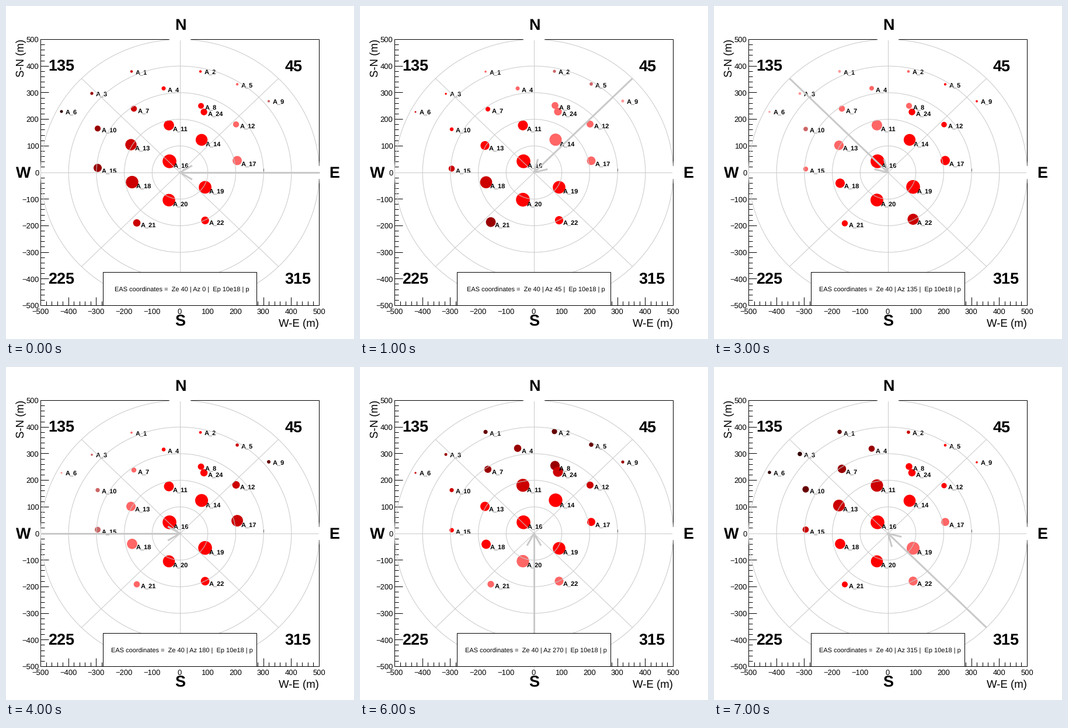
Animation of 596x572 px, one loop 8000 ms. Source, as a matplotlib script:

```python
import numpy as np
import matplotlib.pyplot as plt
from matplotlib.animation import FuncAnimation
from matplotlib.patches import Circle, Ellipse, Rectangle

W, H, DPI = 596, 572, 100
PX = 72 / DPI
CX, CY = 298, 286            # shower core on the stage
SX, SY = 0.477, 0.457        # pixels per metre
LEFT, RIGHT, TOP, BOTTOM = 59, 536, 57, 514
GREY = "#c9c9c9"
ZENITH = np.radians(40)

plt.rcParams["font.family"] = "Liberation Sans"
plt.rcParams["text.hinting"] = "none"

# Ground plan of the detectors
SITES = {
    1: (215, 114), 2: (333, 114), 3: (147, 152), 4: (270, 144),
    5: (396, 136), 6: (95, 183), 7: (219, 180), 8: (334, 175),
    9: (450, 165), 10: (157, 214), 11: (279, 211), 12: (394, 207),
    13: (214, 245), 14: (335, 237), 15: (157, 283), 16: (280, 275),
    17: (396, 271), 18: (216, 310), 19: (341, 319), 20: (279, 341),
    21: (224, 377), 22: (341, 373), 24: (339, 186),
}

# Colour by metres ahead of the core, from late to early arrival
LIMITS = [-400, -317, -226, -130, 100, 290, 383]
SHADES = ["#330000", "#660000", "#990000", "#cc0000",
          "#ff0000", "#ff6666", "#cc6666", "#ff9999"]


def signal_radius(dist, ahead):
    """Dot radius: falls with distance from the tilted shower axis."""
    d = np.sqrt(dist ** 2 - (ahead * np.sin(ZENITH)) ** 2)
    r = 12.8 / (1 + (d / 217) ** 2.75) * (1 - ahead / 1800)
    return min(r, 11.8)


fig = plt.figure(figsize=(W / DPI, H / DPI), dpi=DPI, facecolor="white")
ax = fig.add_axes([0, 0, 1, 1])
ax.set_xlim(0, W)
ax.set_ylim(H, 0)
ax.axis("off")


def line(xs, ys, color="black", width=1, z=1):
    return ax.plot(xs, ys, color=color, lw=width * PX, zorder=z,
                   solid_capstyle="butt", solid_joinstyle="miter")[0]


def text(x, y, s, size, ha="center", bold=False, z=7):
    """Write s with its capitals centred on y."""
    return ax.text(x, y + 0.34 * size, s, fontsize=size * PX, ha=ha,
                   va="baseline", weight="bold" if bold else "normal",
                   zorder=z)


def rect(x0, y0, x1, y1, edge="none", z=5):
    ax.add_patch(Rectangle((x0, y0), x1 - x0, y1 - y0, facecolor="white",
                           edgecolor=edge, lw=PX, zorder=z))


def draw_axes():
    line([LEFT, RIGHT, RIGHT, LEFT, LEFT], [TOP, TOP, BOTTOM, BOTTOM, TOP])
    for m in range(-500, 501, 20):
        x, y = CX - 0.5 + m * SX, CY - 0.5 - m * SY
        size = 14 if m % 100 == 0 else 7
        line([x, x], [BOTTOM, BOTTOM - size])
        line([LEFT, LEFT + size], [y, y])
        if m % 100 == 0:
            label = str(m).replace("-", "\u2212")
            text(x, 524, label, 13)
            text(56.3, y + 0.8, label, 13, ha="right")
    text(536, 545, "W-E (m)", 18.7, ha="right")
    ax.text(31.5, 57, "S-N (m)", fontsize=18.7 * PX, rotation=90, ha="right",
            va="baseline", rotation_mode="anchor", zorder=7)


def draw_grid():
    for m in range(100, 501, 100):
        ax.add_patch(Ellipse((CX, CY), 2 * m * SX, 2 * m * SY, fill=False,
                             edgecolor=GREY, lw=PX, zorder=4))
    line([LEFT, RIGHT], [CY, CY], GREY, z=4)
    line([CX, CX], [TOP, BOTTOM], GREY, z=4)
    dx, dy = 500 * SX * np.sqrt(0.5), 500 * SY * np.sqrt(0.5)
    for s in (-1, 1):
        line([CX - dx, CX + dx], [CY - s * dy, CY + s * dy], GREY, z=4)


def draw_signs():
    rect(280, 18, 316, 59)
    rect(535, 275, 580, 297)
    for x, y, s in [(298.5, 32, "N"), (298, 541, "S"), (30, 286, "W"),
                    (562, 286, "E"), (94.5, 103, "135"), (493, 103, "45"),
                    (94.5, 469, "225"), (500, 469, "315")]:
        text(x, y, s, 27, bold=True)
    line([441, 441], [279, 284], z=3)


draw_axes()
draw_grid()
draw_signs()

dots = []
for n, (x, y) in SITES.items():
    dots.append(ax.add_patch(Circle((x, y), 1, lw=0, zorder=2)))
    text(x + 6.5, y, f"A_{n}", 11, ha="left", bold=True, z=3)

shaft = line([], [], GREY, 3, z=6)
head = line([], [], GREY, 3, z=6)
rect(166, 457, 429, 514, edge="black", z=6.5)
info = text(301, 486.5, "", 11)


def update(i):
    deg = 45 * i
    c, s = np.cos(np.radians(deg)), np.sin(np.radians(deg))

    for dot, (x, y) in zip(dots, SITES.values()):
        east, north = (x - CX) / SX, (CY - y) / SY
        ahead = east * c + north * s
        r = signal_radius(np.hypot(east, north), ahead)
        dot.set_center((x, y - 0.7 * r))
        dot.set_radius(r)
        dot.set_facecolor(SHADES[np.searchsorted(LIMITS, ahead)])

    shaft.set_data([CX + 500 * SX * c, CX], [CY - 500 * SY * s, CY])
    sides = np.arctan2(SY * s, SX * c) + np.radians([30, -30])
    hx, hy = CX + 24 * np.cos(sides), CY - 24 * np.sin(sides)
    head.set_data([hx[0], CX, hx[1]], [hy[0], CY, hy[1]])

    info.set_text(f"EAS coordinates =  Ze 40 | Az {deg} |  Ep 10e18 | p")
    return [*dots, shaft, head, info]


anim = FuncAnimation(fig, update, frames=8, interval=1000,
                     repeat=True, repeat_delay=0, blit=False)
plt.show()
```
